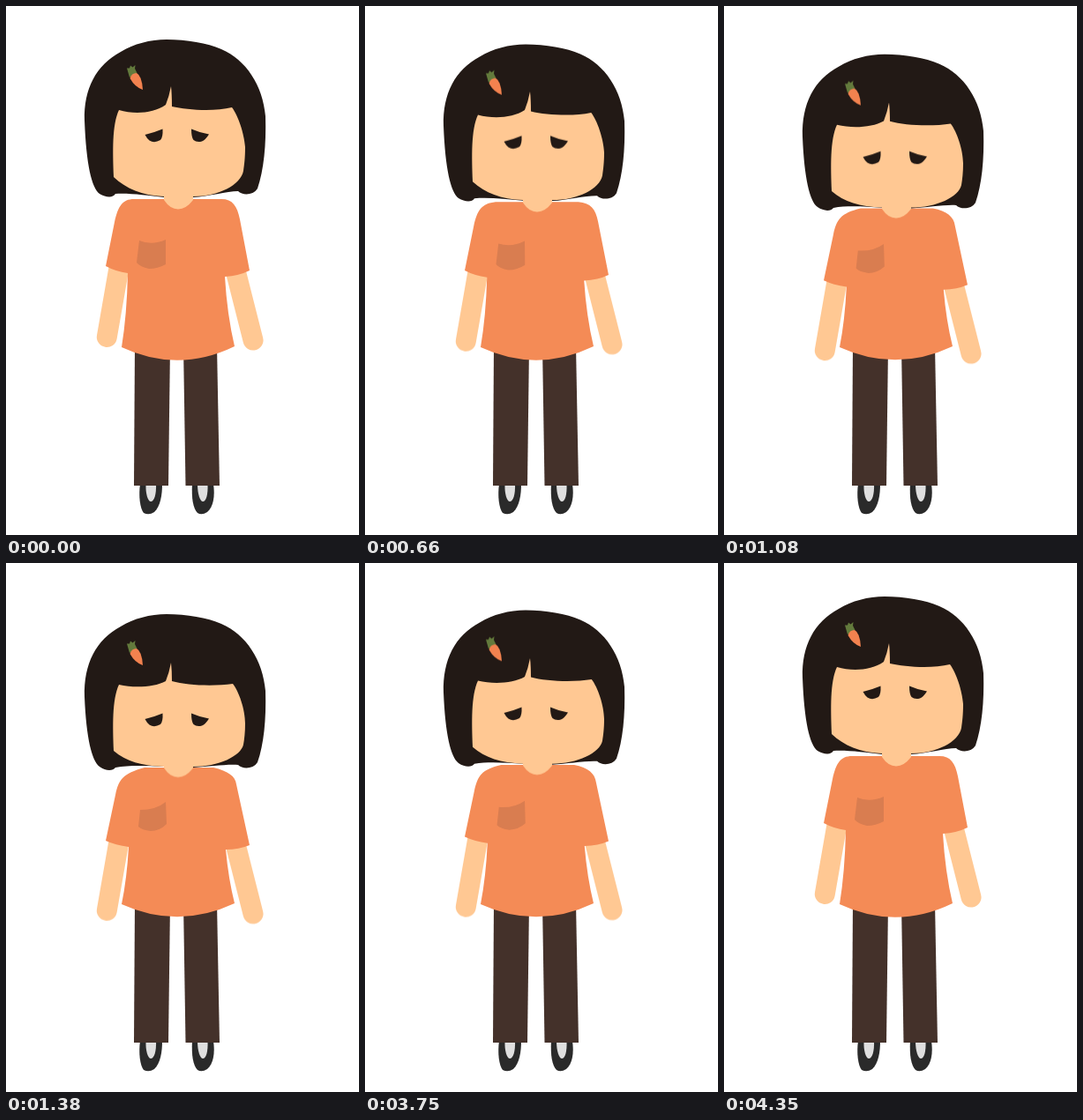
An HTML page that plays this animation: 400x600 px, repeating every 4.56 s.

```html
<!DOCTYPE html>
<html lang="en">
<head>
<meta charset="utf-8">
<title>Breathing girl</title>
<style>
  html, body { margin: 0; width: 100%; height: 100%; overflow: hidden; background: #fff; }
  svg { display: block; width: 100%; height: 100%; }

  :root {
    --sink: cubic-bezier(.33, 0, .65, 1);
    --rise: cubic-bezier(.42, 0, .3, 1);
    --skin: #ffc893;
    --hair: #221915;
  }
  .move { animation: 4560ms var(--sink) infinite; }
  .head { animation-timing-function: cubic-bezier(.31, 0, .61, 1); }

  .skin { fill: var(--skin); }
  .dark { fill: var(--hair); }
  .shoe { fill: #2a2a2a; }
  .sock { fill: #dfdfdf; }
  .pants { fill: #44312a; }

  #arms { animation-name: arms; fill: none; stroke: var(--skin); stroke-width: 23; stroke-linecap: round; }
  #shirt { animation-name: shirt; fill: #f48b56; }
  #pocket { animation-name: pocket; fill: #d97d50; }
  #hair { animation-name: hair; }
  #face { animation-name: face; }
  #neck { animation-name: neck; }
  #eyes { animation-name: eyes; }
  #clip { animation-name: clip; }

  /* Each part is held high, sinks, is held low, then rises. */
  @keyframes arms {
    0%, 7.1%, 95.4%, to { transform: translateY(0); }
    30.26%, 79.6% { transform: translateY(18.7px); animation-timing-function: var(--rise); }
  }
  @keyframes neck {
    0%, 7.1%, 95.4%, to { transform: translateY(0); }
    30.26%, 79.6% { transform: translateY(12.5px); animation-timing-function: var(--rise); }
  }
  @keyframes eyes {
    0%, 7.1%, 95.4%, to { transform: translateY(0); }
    30.26%, 79.6% { transform: translateY(31px); animation-timing-function: var(--rise); }
  }
  @keyframes clip {
    0%, 7.1%, 95.4%, to { transform: translateY(0); }
    30.26%, 79.6% { transform: translateY(21px); animation-timing-function: var(--rise); }
  }
  @keyframes shirt {
    0%, 7.1%, 95.4%, to {
      d: path("M113 295L123 245C127 227 132 219 145 219L179 219L212 219L244 219C257 219 262 227 265 242L276 300Q264 306 248 307Q250.500 350 259 386Q195 417 131 387Q137 350 138 303Q124 301 113 295Z");
    }
    30.26%, 79.6% {
      d: path("M113 315L124 263C128 245 132 239 157 232L179 232L212 232L235 232C252 236 260 242 261 251L276 320Q264 325 249 325Q252 358 259 386Q195 416 131 387Q137 358 139 322Q124 320 113 315Z");
      animation-timing-function: var(--rise);
    }
  }
  @keyframes pocket {
    0%, 7.1%, 95.4%, to {
      d: path("M151 266Q165 272 181 265L181 293Q172 298 162 298Q152 296 148 291Z");
    }
    30.26%, 79.6% {
      d: path("M152 280Q170 280 181 271L182 296Q174 304 164 304Q154 303 150 299Z");
      animation-timing-function: var(--rise);
    }
  }
  @keyframes hair {
    0%, 7.1%, 95.4%, to {
      d: path("M89 130C88 94 102 67 130 52C145 43 163 38 182 38C205 38 228 42 244 49C272 61 291 90 294 125C295 158 292 186 285 207C280 215 268 215 263 210C250 210 230 216 212 217L179 217C160 215 140 212 124 213C121 218 113 217 106 213C97 206 91 180 89 130Z");
    }
    30.26%, 79.6% {
      d: path("M89 152C88 114 102 87 130 72C145 63 163 58 182 58C205 58 228 62 244 69C272 81 291 110 294 145C295 178 292 206 285 226C280 234 268 234 263 229C250 228 230 231 212 232L179 231C160 230 140 229 124 232C121 236 113 236 106 231C97 224 91 198 89 152Z");
      animation-timing-function: var(--rise);
    }
  }
  @keyframes face {
    0%, 7.1%, 95.4%, to {
      d: path("M128 118C145 123 167 122 181 112Q185 102 187 91Q188 100 188 114C205 118 236 120 256 115C263 124 270 145 271 160C271 172 270 180 269 187C266 203 241 216 212 216L179 216C154 215 136 207 122 194C121 165 120 135 128 118Z");
    }
    30.26%, 79.6% {
      d: path("M128 138C145 142 168 141 181 134Q185 124 187 113Q188 122 188 134C205 139 236 140 257 137C264 146 271 166 271 182C271 192 270 200 269 206C266 219 241 231 212 231L179 231C154 230 136 225 122 213C121 186 120 155 128 138Z");
      animation-timing-function: var(--rise);
    }
  }
</style>
</head>
<body>
<svg viewBox="0 0 400 600">
  <path class="shoe" d="M152 542C150 556 152 570 156 575Q162 578 168 574C175 567 177 555 177 542Z"/>
  <path class="shoe" d="M211 542C210 558 212 570 217 575Q222 578 228 574C235 568 237 556 235 542Z"/>
  <path class="sock" d="M158.500 542C158 554 161 562 164 562C168 562 170.500 554 170 542Z"/>
  <path class="sock" d="M217 542C217 554 220 562 223 562C227 562 229 554 228.500 542Z"/>
  <path class="pants" d="M146 385H186L184 544H145Z"/>
  <path class="pants" d="M201 385H239L242 544H203.500Z"/>

  <path id="arms" class="move" d="M128.500 294L114.300 375.500M258.500 294L280 379"/>
  <path id="shirt" class="move"/>
  <path id="pocket" class="move"/>

  <path id="hair" class="move head dark"/>
  <path id="face" class="move head skin"/>
  <path id="neck" class="move skin" d="M179 214H212V220Q204 230.500 195 230.500Q186 230.500 179 220Z"/>
  <g id="eyes" class="move dark">
    <path d="M157.500 146Q168 143.500 177.500 139.500Q178 149 175 152Q168 156 162.500 152.500Q159.500 150 157.500 146Z"/>
    <path d="M210 139.500Q219 143.500 230 145.500Q226 152 222 153.500Q216 155 212.500 152Q210 149 210 139.500Z"/>
  </g>
  <g id="clip" class="move head">
    <path fill="#637a3c" d="M140 81L137 70.500L140 70.500L141 67.500L143.500 69.500L146.500 67L146 71L148.500 76Z"/>
    <path fill="#f2824f" d="M140.500 82Q142 76 148 76Q154 79 155 95Q146 92 140.500 82Z"/>
  </g>
</svg>
</body>
</html>
```
